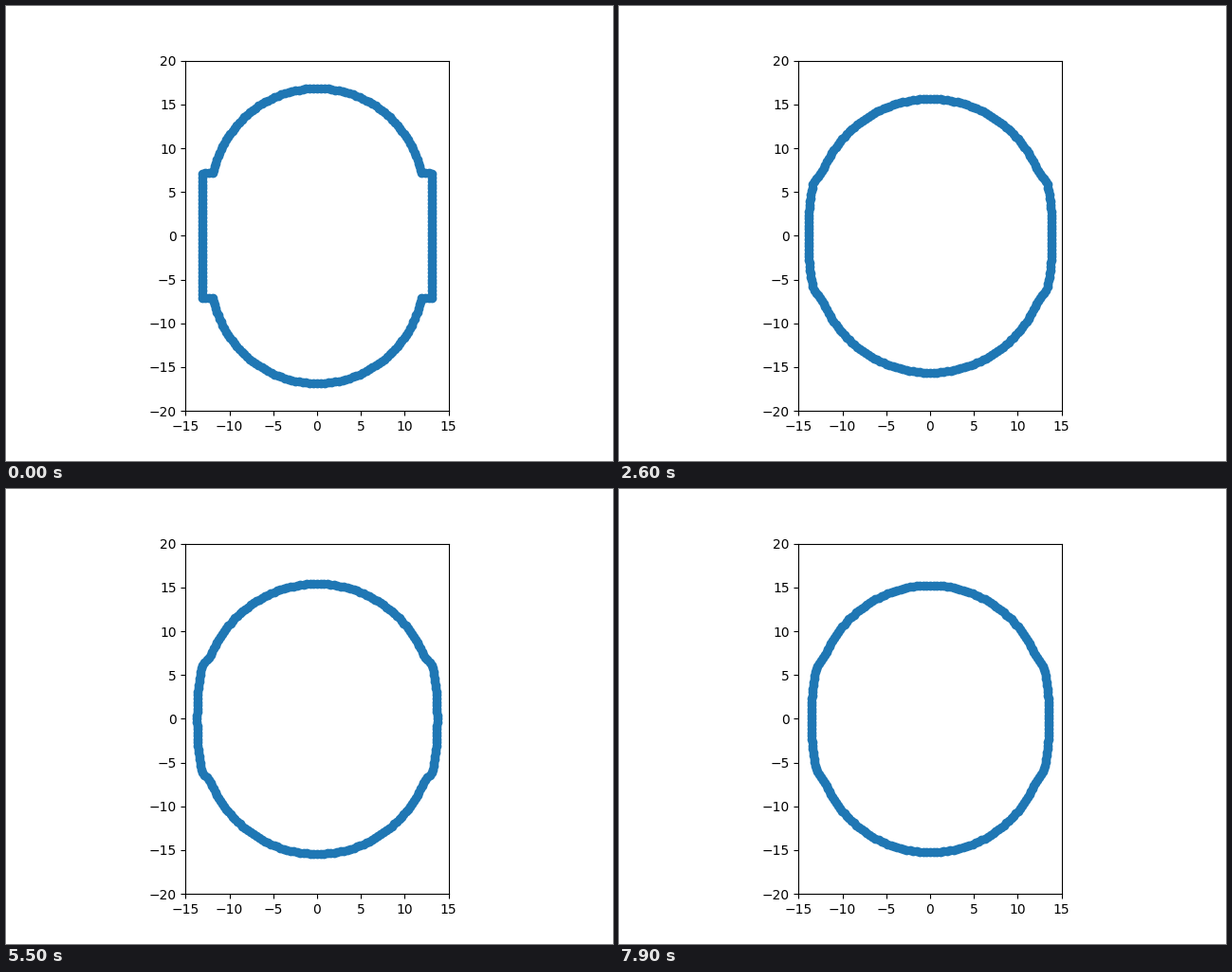
Write a matplotlib script that moves like this. It is 640 px wide and 480 px high and loops after 8000 ms.

```python
import numpy as np
import matplotlib.pyplot as plt
from matplotlib.animation import FuncAnimation

FRAMES, STEP = 80, 100  # count, ms
POINTS = 240


def relax(start, settled, drift, tau, t):
    """Exponential settling onto a slowly shrinking value."""
    return settled + drift * t + (start - settled) * np.exp(-t / tau)


def quadrant(t):
    """Upper right quarter, from the side (w, 0) to the top (0, h)."""
    w = relax(13.08, 14.05, -0.065, 0.25, t)
    h = relax(16.83, 15.82, -0.072, 0.25, t)
    sx = relax(13.08, 13.45, -0.062, 1.0, t)
    sy = relax(7.15, 6.45, -0.05, 1.0, t)
    nx = relax(11.85, 12.55, -0.065, 0.25, t)
    ny = 7.15

    y = np.linspace(0, sy, 200)
    side = w - (w - sx) * (y / sy) ** 2.6 + 1j * y
    notch = np.linspace(sx + 1j * sy, nx + 1j * ny, 40)
    yc = (h**2 - nx**2 - ny**2) / (2 * (h - ny))
    a = np.linspace(np.arctan2(ny - yc, nx), np.pi / 2, 400)
    cap = 1j * yc + (h - yc) * np.exp(1j * a)
    return np.concatenate([side, notch[1:], cap[1:]])


def resample(z, n):
    s = np.concatenate([[0], np.cumsum(np.abs(np.diff(z)))])
    u = np.linspace(0, s[-1], n + 1)
    return np.interp(u, s, z.real) + 1j * np.interp(u, s, z.imag)


def outline(t):
    q = resample(quadrant(t), POINTS // 4)
    left = -q.conj()[::-1]
    half = np.concatenate([q[:-1], left[:-1]])
    z = np.concatenate([half, -half])
    sigma = 1.1 * (1 - np.exp(-t / 1.0))  # corner rounding, in samples
    k = 2 * np.pi * np.fft.fftfreq(POINTS)
    return np.fft.ifft(np.fft.fft(z) * np.exp(-((k * sigma) ** 2) / 2))


fig, ax = plt.subplots(figsize=(6.4, 4.8), dpi=100)
ax.set_aspect("equal")
ax.set_xlim(-15, 15)
ax.set_ylim(-20, 20)
ax.set_xticks(range(-15, 16, 5))
ax.set_yticks(range(-20, 21, 5))
dots, = ax.plot([], [], "o", color="C0")


def update(i):
    z = outline(i * STEP / 1000)
    dots.set_data(z.real, z.imag)
    return dots,


anim = FuncAnimation(fig, update, frames=FRAMES, interval=STEP,
                     repeat=True, repeat_delay=0)
plt.show()
```
